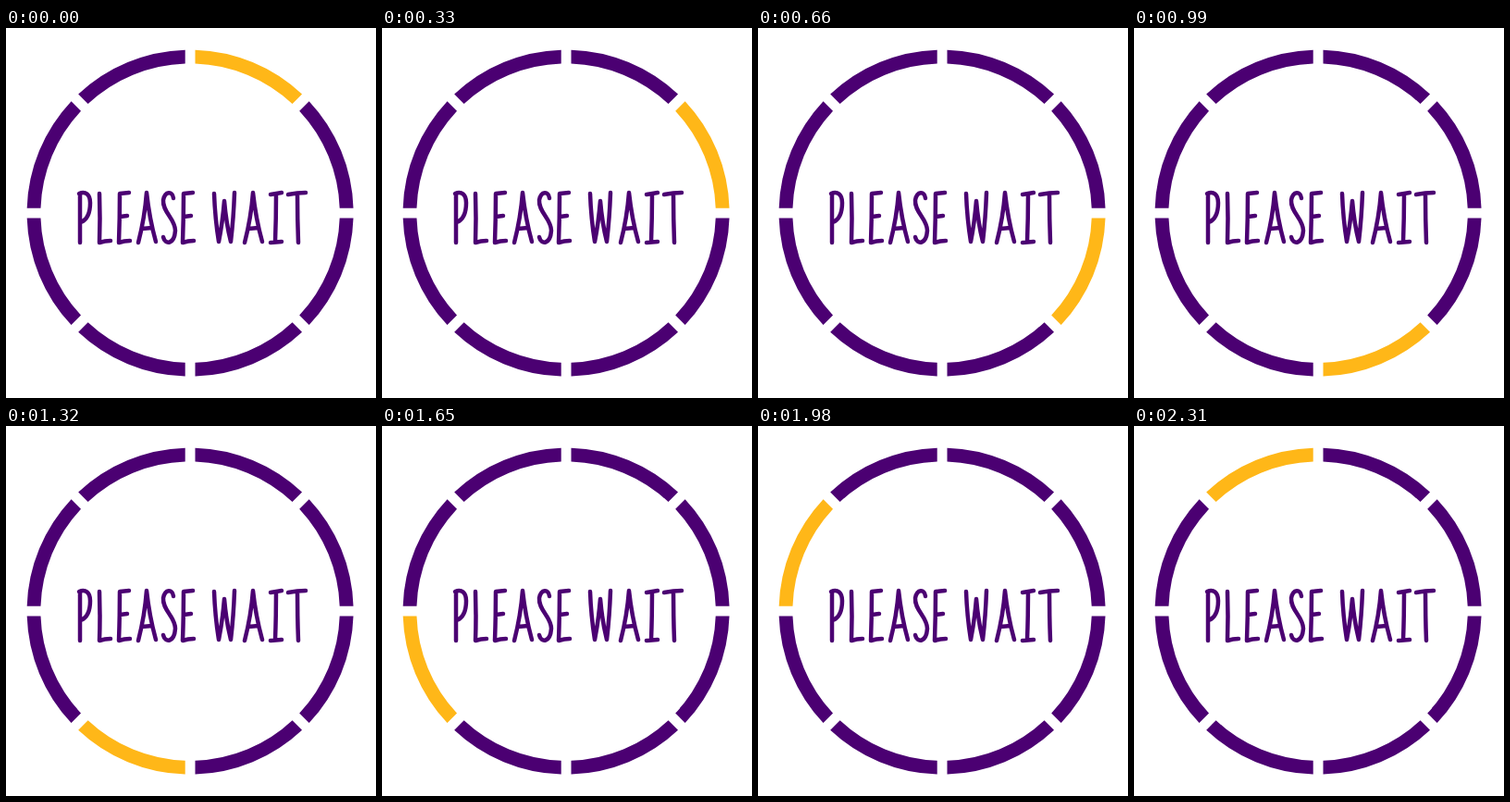
Write an HTML page that moves like this. It is 400 px wide and 400 px high and loops after 2.64 s.

```html
<!DOCTYPE html>
<html lang="en">
<head>
<meta charset="utf-8">
<title>Please wait</title>
<style>
  html, body { margin: 0; width: 100%; height: 100%; overflow: hidden; background: #fff; }
  svg { display: block; width: 100%; height: 100%; }
  .lettering { fill: none; stroke: #4b0072; stroke-width: 4.5; stroke-linecap: round; stroke-linejoin: round; }
  text { font-family: "Open Sans", sans-serif; font-size: 46px; text-anchor: middle; fill: transparent; }
</style>
</head>
<body>
<svg viewBox="0 0 400 400">
  <g id="ring"></g>
  <g class="lettering" aria-hidden="true">
    <path d="M80 179 Q80 206 80 232 M79 179 C86 176 91 180 91 189 C91 199 88 207 81 210"/>
    <path d="M101 179 Q102 206 101 232 Q107 230 113 230"/>
    <path d="M133 178 L123 179 Q123 206 122 232 Q128 230 134 230 M123 204 L131 203"/>
    <path d="M143 232 Q150 205 152 178 Q155 206 162 231 M147 217 L158 216"/>
    <path d="M181 184 C180 176 172 176 170 186 C169 199 183 206 183 219 C182 234 172 235 170 226"/>
    <path d="M202 178 L192 179 Q192 206 191 232 Q197 230 203 230 M192 204 L200 203"/>
    <path d="M225 179 Q226 206 230 231 Q234 211 236 187 Q238 211 243 231 Q246 206 247 178"/>
    <path d="M258 232 Q265 205 267 178 Q270 206 277 231 M262 217 L273 216"/>
    <path d="M286 180 L298 178 M292 180 Q292 206 291 231 M286 232 L298 231"/>
    <path d="M305 180 Q315 178 324 178 M315 180 Q315 207 316 232"/>
  </g>
  <text x="200" y="222">PLEASE WAIT</text>
</svg>
<script>
  const CENTER = { x: 199.1, y: 200.1 };
  const OUTER = 176.5, INNER = 161.7, HALF_GAP = 5.4;
  const COUNT = 8, STEP_MS = 330;
  const PURPLE = "#4b0072", YELLOW = "#ffb718";
  const ring = document.getElementById("ring");

  // Angles run clockwise from twelve o'clock.
  function point(radius, angle) {
    const x = CENTER.x + radius * Math.sin(angle);
    const y = CENTER.y - radius * Math.cos(angle);
    return `${x.toFixed(2)} ${y.toFixed(2)}`;
  }

  // Insetting by asin(gap / radius) keeps the sides of each gap parallel.
  function segmentPath(index) {
    const sweep = 2 * Math.PI / COUNT;
    const start = index * sweep, end = start + sweep;
    const outer = Math.asin(HALF_GAP / OUTER), inner = Math.asin(HALF_GAP / INNER);
    return `M${point(OUTER, start + outer)}` +
      `A${OUTER} ${OUTER} 0 0 1 ${point(OUTER, end - outer)}` +
      `L${point(INNER, end - inner)}` +
      `A${INNER} ${INNER} 0 0 0 ${point(INNER, start + inner)}Z`;
  }

  const segments = Array.from({ length: COUNT }, (_, index) => {
    const path = document.createElementNS("http://www.w3.org/2000/svg", "path");
    path.setAttribute("d", segmentPath(index));
    return ring.appendChild(path);
  });

  function render(time) {
    const active = Math.floor(time / STEP_MS) % COUNT;
    segments.forEach((path, index) => {
      path.setAttribute("fill", index === active ? YELLOW : PURPLE);
    });
  }

  const startTime = performance.now();
  function tick() {
    render(performance.now() - startTime);
    requestAnimationFrame(tick);
  }
  tick();
</script>
</body>
</html>
```
